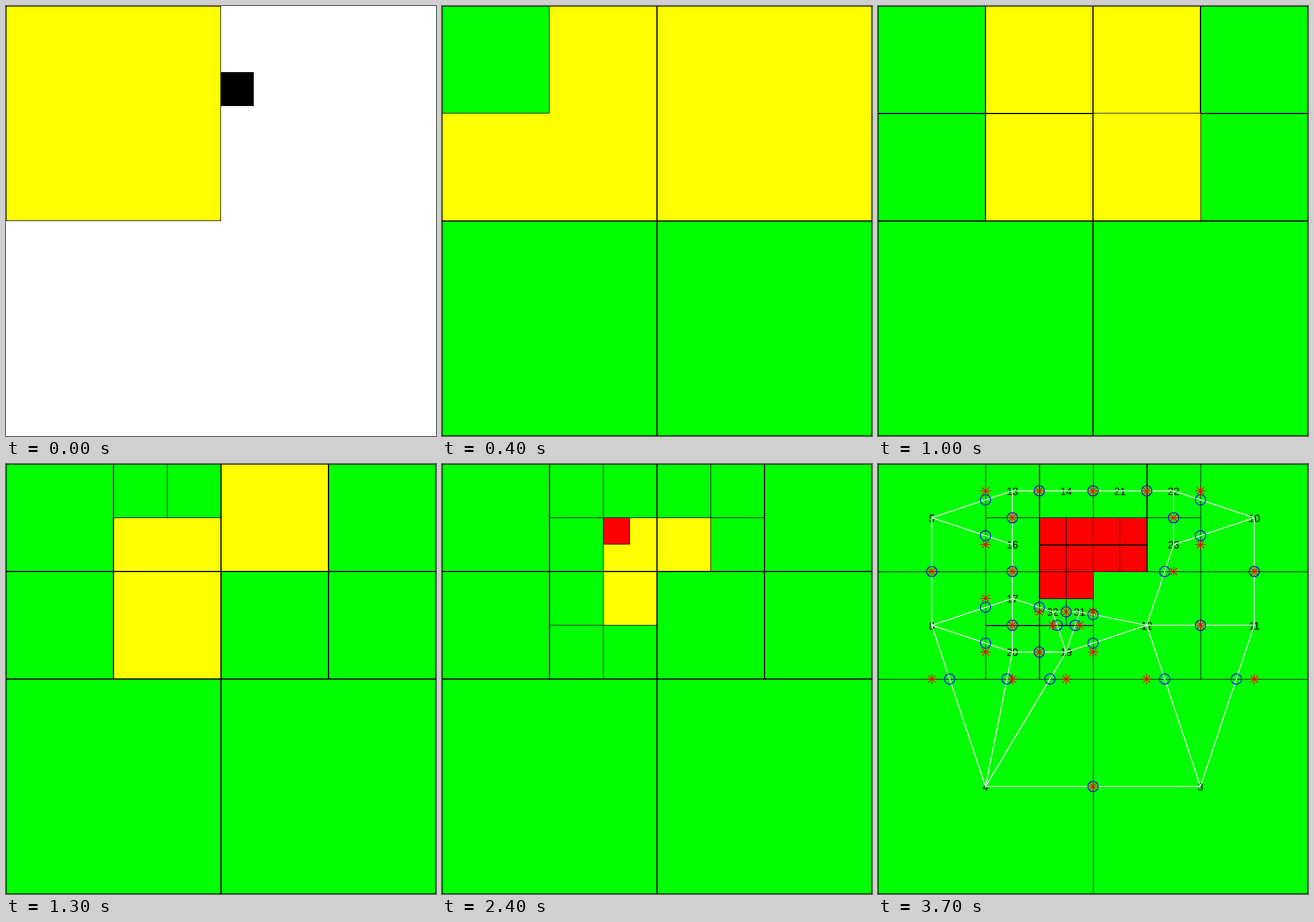
Animation of 748x748 px, one loop 3.8 s. Source, as an HTML page with a canvas:

```html
<!DOCTYPE html>
<html>
<head>
<meta charset="utf-8">
<title>Quadtree decomposition</title>
<style>
html, body { margin: 0; width: 100%; height: 100%; overflow: hidden; background: #fff; }
canvas { display: block; }
</style>
</head>
<body>
<canvas id="stage" width="748" height="748"></canvas>
<script>
const ctx = document.getElementById('stage').getContext('2d');
const SIZE = 748, UNITS = 1024, K = SIZE / UNITS;
const COLORS = { y: '#ff0', g: '#0f0', r: '#f00' };

// Every yellow cell splits clockwise from its top left quarter, breadth first.
const kinds = 'yygg' + 'gyygyggg' + 'ggyggygggggy' + 'rrrrrrggrrrr';
const cells = [];
function split({ x, y, s }) {
  const h = s / 2;
  for (const [dx, dy] of [[0, 0], [h, 0], [h, h], [0, h]]) {
    const id = cells.length + 1;
    cells.push({ id, x: x + dx, y: y + dy, s: h, kind: kinds[id - 1] });
  }
}
split({ x: 0, y: 0, s: UNITS });
for (let i = 0; i < cells.length; i++) if (cells[i].kind === 'y') split(cells[i]);

// Neighbouring free cells: joined centres, middle of the shared side, crossing point.
const free = cells.filter(c => c.kind === 'g');
const center = c => [(c.x + c.s / 2) * K, (c.y + c.s / 2) * K];
const links = [];
function link(a, b, u, v) {
  if (a[u] + a.s !== b[u]) return;
  const lo = Math.max(a[v], b[v]), hi = Math.min(a[v] + a.s, b[v] + b.s);
  if (lo >= hi) return;
  const p = center(a), q = center(b), i = u === 'x' ? 0 : 1, j = 1 - i;
  const mid = [], cross = [];
  mid[i] = cross[i] = b[u] * K;
  mid[j] = (lo + hi) / 2 * K;
  cross[j] = p[j] + (q[j] - p[j]) * (cross[i] - p[i]) / (q[i] - p[i]);
  links.push({ p, q, mid, cross });
}
for (const a of free) for (const b of free) {
  link(a, b, 'x', 'y');
  link(a, b, 'y', 'x');
}

function box(color, x, y, w, h) {
  ctx.fillStyle = color;
  ctx.fillRect(x, y, w, h);
}

function drawCell({ x, y, s, kind }) {
  const px = u => Math.round(u * (SIZE - 1) / (UNITS - 1));
  const l = px(x), t = px(y), w = px(x + s - 1) - l + 1, h = px(y + s - 1) - t + 1;
  box('#000', l, t, w, h);
  box(COLORS[kind], l + 1, t + 1, w - 2, h - 2);
}

function stroke(color, width, path) {
  ctx.strokeStyle = color;
  ctx.lineWidth = width;
  ctx.beginPath();
  path();
  ctx.stroke();
}

function line(x1, y1, x2, y2) {
  ctx.moveTo(x1, y1);
  ctx.lineTo(x2, y2);
}

function star([x, y]) {
  const r = 9, d = 6.3;
  line(x - r, y, x + r, y);
  line(x, y - r, x, y + r);
  line(x - d, y - d, x + d, y + d);
  line(x - d, y + d, x + d, y - d);
}

function drawGraph() {
  box('#000', 0, 0, SIZE, SIZE);
  box(COLORS.g, 1, 1, SIZE - 2, SIZE - 2);
  box(COLORS.r, 281, 94, 186, 93);
  box(COLORS.r, 281, 187, 93, 47);
  // position, start, end, thickness
  const columns = [[187, 0, 374, 1], [280, 0, 374, 2], [327, 94, 280, 1], [374, 0, 748, 1],
    [420, 94, 187, 1], [467, 0, 187, 2], [561, 0, 374, 1]];
  const rows = [[93, 187, 561, 1], [140, 281, 467, 2], [187, 0, 748, 1],
    [234, 281, 374, 1], [280, 187, 374, 2], [374, 0, 748, 1]];
  for (const [x, a, b, w] of columns) box('#000', x, a, w, b - a);
  for (const [y, a, b, w] of rows) box('#000', a, y, b - a, w);

  ctx.fillStyle = '#000';
  ctx.font = '18px "Liberation Sans", Arial, sans-serif';
  ctx.textAlign = 'center';
  for (const c of free) {
    const [x, y] = center(c);
    ctx.fillText(c.id, x, y + 7);
  }
  stroke('#fff', 1.5, () => links.forEach(l => line(...l.p, ...l.q)));
  stroke('#00f', 1.5, () => links.forEach(({ cross: [x, y] }) => {
    ctx.moveTo(x + 9, y);
    ctx.arc(x, y, 9, 0, 2 * Math.PI);
  }));
  stroke('#f00', 1.3, () => links.forEach(l => star(l.mid)));
}

function frame(now) {
  const step = Math.floor(now % 3800 / 100);
  if (step === 37) {
    drawGraph();
  } else {
    box('#fff', 0, 0, SIZE, SIZE);
    box('#000', 374, 115, 57, 59);
    cells.slice(0, step + 1).forEach(drawCell);
  }
  requestAnimationFrame(frame);
}
frame(0);
</script>
</body>
</html>
```
